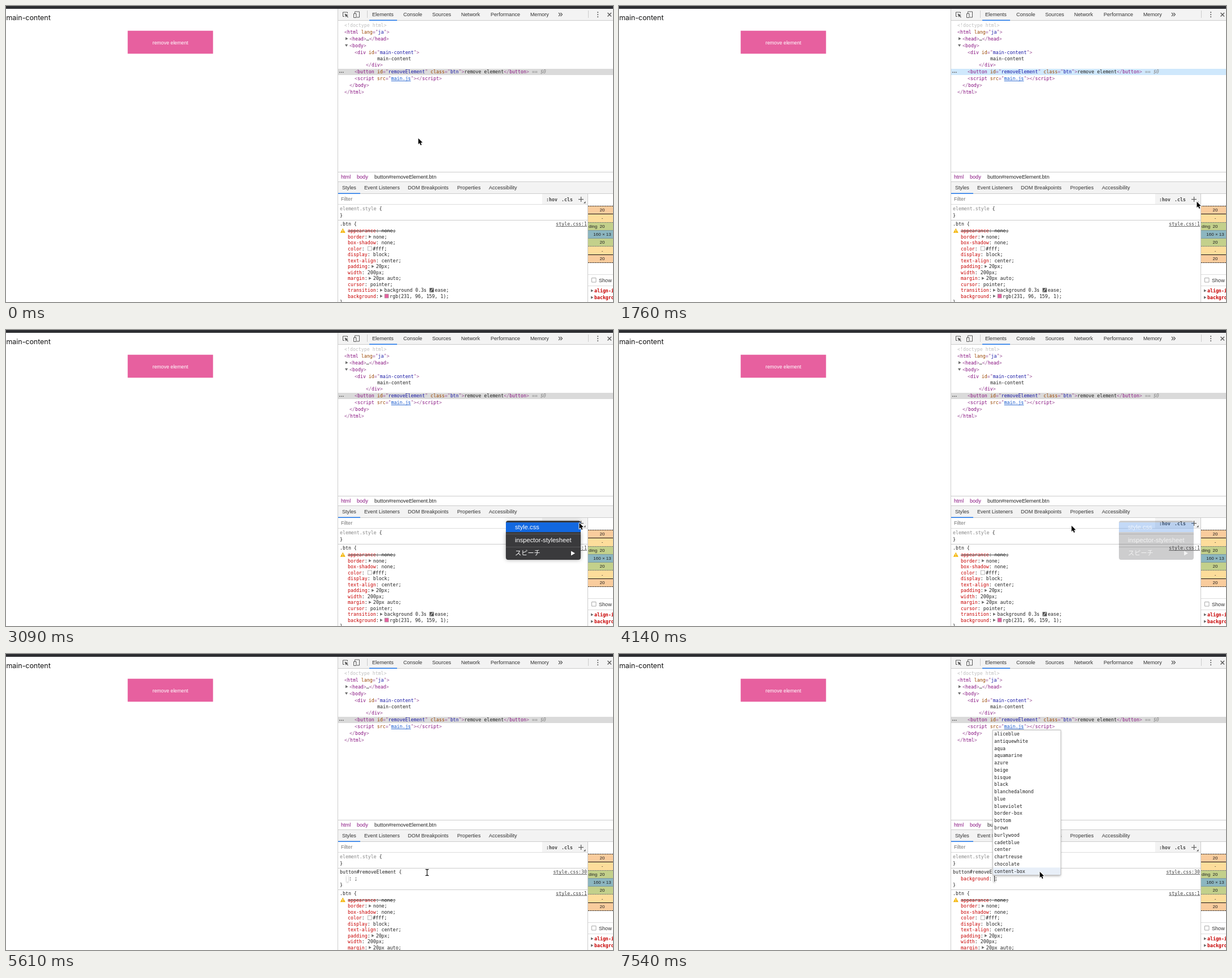
These frames come from a looping animation (1071x523 px, 7.99 s). An HTML page with a canvas:

```html
<!DOCTYPE html>
<html lang="en">
<head>
<meta charset="utf-8">
<title>Inspector: adding a style rule</title>
<style>
html, body { margin: 0; width: 100%; height: 100%; overflow: hidden; background: #fff; }
canvas { display: block; }
</style>
</head>
<body>
<canvas id="stage" width="1071" height="523"></canvas>
<script>
const ctx = document.getElementById('stage').getContext('2d');
const LOOP = 7990;
const MONO = '8.25px "DejaVu Sans Mono", monospace';
const UI = '9.1px "Liberation Sans", Arial, sans-serif';
const CHAR = 4.967;
const INK = '#222', TAG = '#881280', PUNCT = '#a0589b', ATTR = '#994500', VALUE = '#1a1aa6', PROP = '#c80000';
const LINE = '#cccccc', BAR = '#f3f3f3', BLUE = '#1a73e8';

// Pointer positions: [time, x, y, is text cursor]
const POINTER = [
  [0, 728, 234], [750, 721, 237], [880, 716, 239],
  [1460, 778, 259], [1610, 905, 308], [1760, 1020, 346], [1900, 1058, 357], [2050, 1012, 341],
  [4140, 799, 346], [4280, 772, 360], [4430, 748, 375], [4580, 738, 382, true], [4720, 731, 386, true],
  [5310, 743, 386, true], [7540, 743, 385]
];
const TYPED = [[6510, 'b'], [6660, 'ba'], [6950, 'bac'], [7100, 'back']];
const SUFFIXES = ['', '-attachment', '-blend-mode', '-clip', '-color', '-image', '-origin', '-position',
  '-position-x', '-position-y', '-repeat', '-repeat-x', '-repeat-y', '-size'];
const PROPERTIES = ['backface-visibility', ...SUFFIXES.map(s => 'background' + s)];
const VALUES = ('aliceblue antiquewhite aqua aquamarine azure beige bisque black blanchedalmond blue blueviolet ' +
  'border-box bottom brown burlywood cadetblue center chartreuse chocolate content-box').split(' ');
const DECLARATIONS = [
  ['appearance', 'none'], ['border', 'none', 'fold'], ['box-shadow', 'none'], ['color', '#fff', '', '#fff'],
  ['display', 'block'], ['text-align', 'center'], ['padding', '20px', 'fold'], ['width', '200px'],
  ['margin', '20px auto', 'fold'], ['cursor', 'pointer'], ['transition', 'background 0.3s ', 'fold'],
  ['background', 'rgb(231, 96, 159, 1)', 'fold', 'rgb(231,96,159)']
];

const latest = (list, t) => list.filter(k => k[0] <= t).pop();

function rect(x, y, w, h, color) {
  ctx.fillStyle = color;
  ctx.fillRect(x, y, w, h);
}

function poly(points, color) {
  ctx.beginPath();
  points.forEach(([x, y]) => ctx.lineTo(x, y));
  ctx.closePath();
  ctx.fillStyle = color;
  ctx.fill();
}

function stroke(points, color, width = 1) {
  ctx.beginPath();
  points.forEach(([x, y], i) => i ? ctx.lineTo(x, y) : ctx.moveTo(x, y));
  ctx.strokeStyle = color;
  ctx.lineWidth = width;
  ctx.stroke();
}

// y is the visual middle of the capitals
function text(str, x, y, color = INK, font = MONO, align = 'left') {
  ctx.font = font;
  ctx.textAlign = align;
  ctx.fillStyle = color;
  ctx.fillText(str, x, y + 3);
}

function runs(x, y, ...parts) {
  for (let i = 0; i < parts.length; i += 2) {
    text(parts[i], x, y, parts[i + 1]);
    x += parts[i].length * CHAR;
  }
  return x;
}

const tag = (x, y, name, open = '<') => runs(x, y, open, PUNCT, name, TAG, '>', PUNCT);
const foldRight = (x, y, color = '#6e6e6e') => poly([[x, y - 2.6], [x + 4.6, y], [x, y + 2.6]], color);

function floating(x, y, w, h, blur) {
  ctx.save();
  ctx.shadowColor = 'rgba(0,0,0,.35)';
  ctx.shadowBlur = blur;
  ctx.shadowOffsetY = 1;
  rect(x, y, w, h, '#fff');
  ctx.restore();
}

function drawPage() {
  rect(0, 0, 1071, 523, '#fff');
  rect(0, 0, 1071, 5, '#2d2e32');
  text('main-content', 0.5, 22, '#111', '12.4px Inter, sans-serif');
  rect(214.7, 43.7, 150.6, 40.6, 'rgb(231,96,159)');
  text('remove element', 290, 64.8, '#fff', '8.8px "Liberation Sans", Arial, sans-serif', 'center');
}

function drawToolbar() {
  rect(585, 5, 1, 518, LINE);
  rect(586, 5, 485, 20, BAR);
  rect(586, 25, 485, 1, LINE);
  const icon = '#5a5a5a';
  stroke([[597, 18.5], [594.5, 18.5], [594.5, 11], [602.5, 11], [602.5, 13]], icon);
  poly([[597.5, 13.5], [604, 16], [601.6, 17], [604, 19.6], [603, 20.5], [600.6, 18], [599.5, 20]], icon);
  stroke([[615.5, 13], [615.5, 10], [623.5, 10], [623.5, 20], [619, 20]], icon);
  ctx.strokeRect(613.5, 13.5, 4.5, 7);
  rect(637, 8, 1, 13, LINE);
  [['Elements', 646], ['Console', 701], ['Sources', 752], ['Network', 803], ['Performance', 855], ['Memory', 925]]
    .forEach(([label, x]) => text(label, x, 15.3, '#333', UI));
  rect(641, 24.5, 49, 1.5, BLUE);
  for (const x of [975, 978.5]) stroke([[x, 12], [x + 3, 15], [x, 18]], icon, 1.2);
  rect(1027, 8, 1, 13, LINE);
  for (const y of [10.5, 14.5, 18.5]) rect(1043.3, y - .2, 1.8, 1.8, icon);
  stroke([[1061.5, 12], [1068, 18.5]], icon, 1.4);
  stroke([[1068, 12], [1061.5, 18.5]], icon, 1.4);
}

function drawTree(t) {
  // The text node and the closing tag after it sit on shorter lines
  const row = i => 33.7 + 12 * i - .75 * Math.min(2, Math.max(0, i - 4));
  rect(586, 111, 485, 11, t >= 1010 && t < 2340 ? '#cfe8fc' : '#dadada');
  text('<!doctype html>', 597, row(0), '#c0c0c0');
  runs(597, row(1), '<', PUNCT, 'html', TAG, ' lang', ATTR, '="', PUNCT, 'ja', VALUE, '">', PUNCT);
  foldRight(599, row(2));
  const headEnd = tag(606, row(2), 'head');
  text('…', headEnd, row(2));
  tag(headEnd + CHAR, row(2), 'head', '</');
  poly([[598, row(3) - 2], [603.2, row(3) - 2], [600.6, row(3) + 2.4]], '#6e6e6e');
  tag(606, row(3), 'body');
  runs(615, row(4), '<', PUNCT, 'div', TAG, ' id', ATTR, '="', PUNCT, 'main-content', VALUE, '">', PUNCT);
  text('main-content', 655, row(5));
  tag(635, row(6), 'div', '</');
  for (let i = 0; i < 3; i++) rect(588 + i * 3, row(7) + .2, 1.6, 1.6, '#666');
  runs(615, row(7), '<', PUNCT, 'button', TAG, ' id', ATTR, '="', PUNCT, 'removeElement', VALUE, '"', PUNCT,
    ' class', ATTR, '="', PUNCT, 'btn', VALUE, '">', PUNCT, 'remove element', INK,
    '</', PUNCT, 'button', TAG, '>', PUNCT);
  text('== $0', 928, row(7), '#888', 'italic ' + MONO);
  const src = runs(615, row(8), '<', PUNCT, 'script', TAG, ' src', ATTR, '="', PUNCT);
  const srcEnd = runs(src, row(8), 'main.js', '#1155cc');
  rect(src, row(8) + 4, srcEnd - src, .8, '#1155cc');
  runs(srcEnd, row(8), '"></', PUNCT, 'script', TAG, '>', PUNCT);
  tag(606, row(9), 'body', '</');
  tag(597, row(10), 'html', '</');
}

function drawPanelBars() {
  rect(586, 293, 485, 1, LINE);
  text('html', 591, 302.3, TAG, UI);
  text('body', 619, 302.3, TAG, UI);
  text('button#removeElement.btn', 650, 302.3, INK, UI);
  rect(586, 310, 485, 21, BAR);
  rect(586, 310, 485, 1, LINE);
  rect(586, 331, 485, 1, LINE);
  [['Styles', 593], ['Event Listeners', 632], ['DOM Breakpoints', 709], ['Properties', 796], ['Accessibility', 852]]
    .forEach(([label, x]) => text(label, x, 321.2, '#333', UI));
  rect(586, 330.5, 39, 1.5, BLUE);
  rect(946, 332, 80, 18, BAR);
  rect(586, 350, 440, 1, '#dddddd');
  text('Filter', 591, 341.3, '#757575', UI);
  text(':hov', 953, 341.5, '#444', 'bold ' + MONO);
  text('.cls', 980, 341.5, '#444', 'bold ' + MONO);
  rect(1010, 341, 9, 1.2, '#5a5a5a');
  rect(1014, 337, 1.2, 9, '#5a5a5a');
  poly([[1022.5, 345], [1022.5, 348.5], [1019, 348.5]], '#5a5a5a');
}

function sourceLink(label, y) {
  const w = label.length * CHAR;
  text(label, 1025, y, '#444', MONO, 'right');
  rect(1025 - w, y + 4, w, .8, '#444');
}

function drawDeclaration([name, value, fold, swatch], i, top) {
  const y = top + 12.2 + 10.5 * i;
  let x = runs(603, y, name, PROP, ':', INK) + CHAR;
  if (fold) {
    foldRight(x - 2.6, y);
    x += CHAR;
  }
  if (swatch) {
    rect(x + .2, y - 4, 7.6, 7.6, '#999');
    rect(x + .9, y - 3.3, 6.2, 6.2, swatch);
    x += 9.5;
  }
  x = runs(x, y, value, INK);
  if (name === 'transition') {
    rect(x + .3, y - 4, 7.5, 7.5, '#555');
    stroke([[x + 1.5, y + 2], [x + 3.5, y + 1], [x + 4.5, y - 2], [x + 6.8, y - 2.5]], '#fff');
    x = runs(x + 9.5, y, 'ease', INK);
  }
  text(';', x, y);
  if (i === 0) {
    rect(603, y - .2, x + CHAR - 603, .9, '#333');
    poly([[594.3, y - 4.5], [598.8, y + 3.5], [589.8, y + 3.5]], '#f4b400');
    rect(593.8, y - 1.8, 1, 2.8, '#fff');
    rect(593.8, y + 1.6, 1, 1, '#fff');
  }
}

function drawRules(t) {
  const added = t >= 4430, editing = t >= 5160;
  const top = 385 + (editing ? 37.5 : added ? 27 : 0);
  runs(589, 358, 'element.style', '#888', ' {', INK);
  text('}', 589, 370);
  rect(586, 378, 440, 1, LINE);
  if (added) {
    if (!editing) rect(589, 380, 100.5, 10.5, '#b3d7fd');
    text('button#removeElement', 589, 385);
    text('{', 589 + 21 * CHAR, 385);
    if (!editing) {
      ctx.strokeStyle = '#c8c8c8';
      ctx.lineWidth = 1;
      ctx.strokeRect(587.5, 379.5, 103, 12);
    }
    sourceLink('style.css:30', 385);
    text('}', 589, editing ? 407.5 : 397);
    rect(586, Math.round(top - 7), 440, 1, LINE);
  }
  text('.btn {', 589, top);
  sourceLink('style.css:1', top);
  DECLARATIONS.forEach((d, i) => drawDeclaration(d, i, top));
  text('}', 589, top + 138.2);
}

function drawSidebar() {
  rect(1026, 332, 1, 191, LINE);
  rect(1027, 332, 44, 191, '#fff');
  const middle = 403;
  const small = '8px "Liberation Sans", Arial, sans-serif';
  const dashed = (y, color) => {
    for (let x = 1027; x < 1071; x += 3) rect(x, y, 2, 1, color);
  };
  const solid = (y, color) => rect(1027, y, 44, 1, color);
  // Nested boxes from the margin inwards: reach above and below the middle, fill, edge, label
  [[50, '#f9cc9d', dashed, '#222', '20'], [36, '#fddd9b', solid, '#111', '-'],
    [21, '#c3d08b', dashed, '#777', '20'], [7, '#8cb6c0', solid, '#7f9a9c', '']]
    .forEach(([reach, fill, edge, color, label]) => {
      rect(1027, middle - reach, 44, 2 * reach + 1, fill);
      edge(middle - reach, color);
      edge(middle + reach, color);
      for (const side of [-1, 1]) text(label, 1052, middle + .4 + side * (reach - 7), INK, small, 'center');
    });
  text('160 × 13', 1052, middle + .4, INK, small, 'center');
  text('ding', 1028, 389.4, INK, small);
  rect(1027, 474, 44, 1, '#ddd');
  rect(1027, 494, 44, 1, '#ddd');
  ctx.strokeStyle = '#aaa';
  ctx.lineWidth = 1;
  ctx.strokeRect(1033.5, 480.5, 7.5, 7.5);
  text('Show', 1046, 484.8, '#333', UI);
  [['align-i', 503], ['backgro', 515]].forEach(([label, y]) => {
    foldRight(1032, y);
    text(label, 1038, y, PROP, 'bold ' + MONO);
  });
}

function drawEditor(t) {
  if (t < 5160) return;
  const y = 397, typed = (latest(TYPED, t) || [0, ''])[1];
  if (t >= 7390) {
    runs(603, y, 'background', PROP, ':', INK);
    floating(660.5, 391.5, 3.5, 11, 3);
    text(';', 662.8, y);
    rect(662, 392, 1, 10, '#111');
    return;
  }
  const name = typed ? 'background' : '';
  const width = name.length * CHAR;
  floating(601, 391.5, width + 3, 11, 3);
  runs(603, y, typed, INK, name.slice(typed.length), '#888');
  text(': ;', 603 + width + (typed ? 0 : 2), y);
  if (typed || t < 5610 || t >= 6210) rect(603 + typed.length * CHAR, 392, 1, 10, '#111');
}

function drawList(items, x, width, selected, color, match = '') {
  const rowHeight = 12.77, bottom = 390, top = bottom - items.length * rowHeight;
  floating(x, top - .5, width, bottom - top + 1, 4);
  ctx.strokeStyle = '#c4c4c4';
  ctx.lineWidth = 1;
  ctx.strokeRect(x - .5, Math.round(top) - .5, width + 1, bottom - Math.round(top) + 1);
  items.forEach((item, i) => {
    const y = top + (i + .5) * rowHeight, on = i === selected;
    if (on) rect(x, y - 6.3, width, 12.7, color);
    const ink = on && match ? '#fff' : INK;
    const at = match ? item.indexOf(match) : 0;
    const start = x + 2 + at * CHAR;
    text(item.slice(0, at), x + 2, y, ink);
    text(match, start, y, ink, 'bold ' + MONO);
    text(item.slice(at + match.length), start + match.length * CHAR, y, ink);
  });
}

function drawSuggestions(t) {
  if (t < 6510) return;
  if (t >= 7390) return drawList(VALUES, 660, 119, t >= 7540 ? 19 : -1, '#e8eff8');
  const typed = latest(TYPED, t)[1];
  const extra = { b: ['block-size'], ba: ['flex-basis'] }[typed] || [];
  drawList([...PROPERTIES, ...extra], 600.3, typed === 'b' ? 149 : 124, 1, '#1668d9', typed);
}

function drawMenu(t) {
  if (t < 2490 || t >= 4280) return;
  const fading = t >= 4140, selected = t >= 2940;
  const font = '11.2px "Liberation Sans", "Noto Sans CJK JP", "Noto Sans CJK", sans-serif';
  ctx.save();
  ctx.globalAlpha = fading ? .25 : 1;
  ctx.shadowColor = 'rgba(0,0,0,.35)';
  ctx.shadowBlur = fading ? 0 : 7;
  // Leave the selected row open so its colour stays clean while fading
  ctx.beginPath();
  ctx.roundRect(882, 337, 132, 69, 4);
  if (selected) ctx.rect(882, 340, 132, 17);
  ctx.fillStyle = '#3a3a3c';
  ctx.fill('evenodd');
  ctx.shadowBlur = 0;
  if (selected) rect(882, 340, 132, 17, '#1268e0');
  for (const y of [360, 383]) rect(882, y, 132, 1, '#58585a');
  ctx.globalAlpha = fading ? .75 : 1;
  ['style.css', 'inspector-stylesheet', 'スピーチ'].forEach((label, i) =>
    text(label, 898, 349 + 23 * i, '#fff', font));
  poly([[997, 390.5], [1004, 394.5], [997, 398.5]], '#fff');
  ctx.restore();
}

function drawPointer(t) {
  const [, x, y, beam] = latest(POINTER, t);
  if (beam) {
    const shape = [[[x - 3, y - 5.5], [x - 1, y - 5.5], [x, y - 4.5], [x + 1, y - 5.5], [x + 3, y - 5.5]],
      [[x, y - 5], [x, y + 5]],
      [[x - 3, y + 5.5], [x - 1, y + 5.5], [x, y + 4.5], [x + 1, y + 5.5], [x + 3, y + 5.5]]];
    shape.forEach(s => stroke(s, 'rgba(255,255,255,.8)', 2.4));
    shape.forEach(s => stroke(s, '#111', 1.2));
    return;
  }
  const arrow = [[0, 0], [0, 10.5], [2.4, 8.4], [4.1, 12.4], [5.9, 11.6], [4.2, 7.7], [7.5, 7.5]]
    .map(([dx, dy]) => [x + dx - .5, y + dy - .3]);
  ctx.lineJoin = 'round';
  stroke([...arrow, arrow[0]], '#fff', 2);
  poly(arrow, '#000');
}

function draw(t) {
  drawPage();
  drawToolbar();
  drawTree(t);
  drawPanelBars();
  drawRules(t);
  drawSidebar();
  drawEditor(t);
  drawSuggestions(t);
  drawMenu(t);
  drawPointer(t);
}

const start = performance.now();
function tick() {
  draw((performance.now() - start) % LOOP);
  requestAnimationFrame(tick);
}
tick();
</script>
</body>
</html>
```
